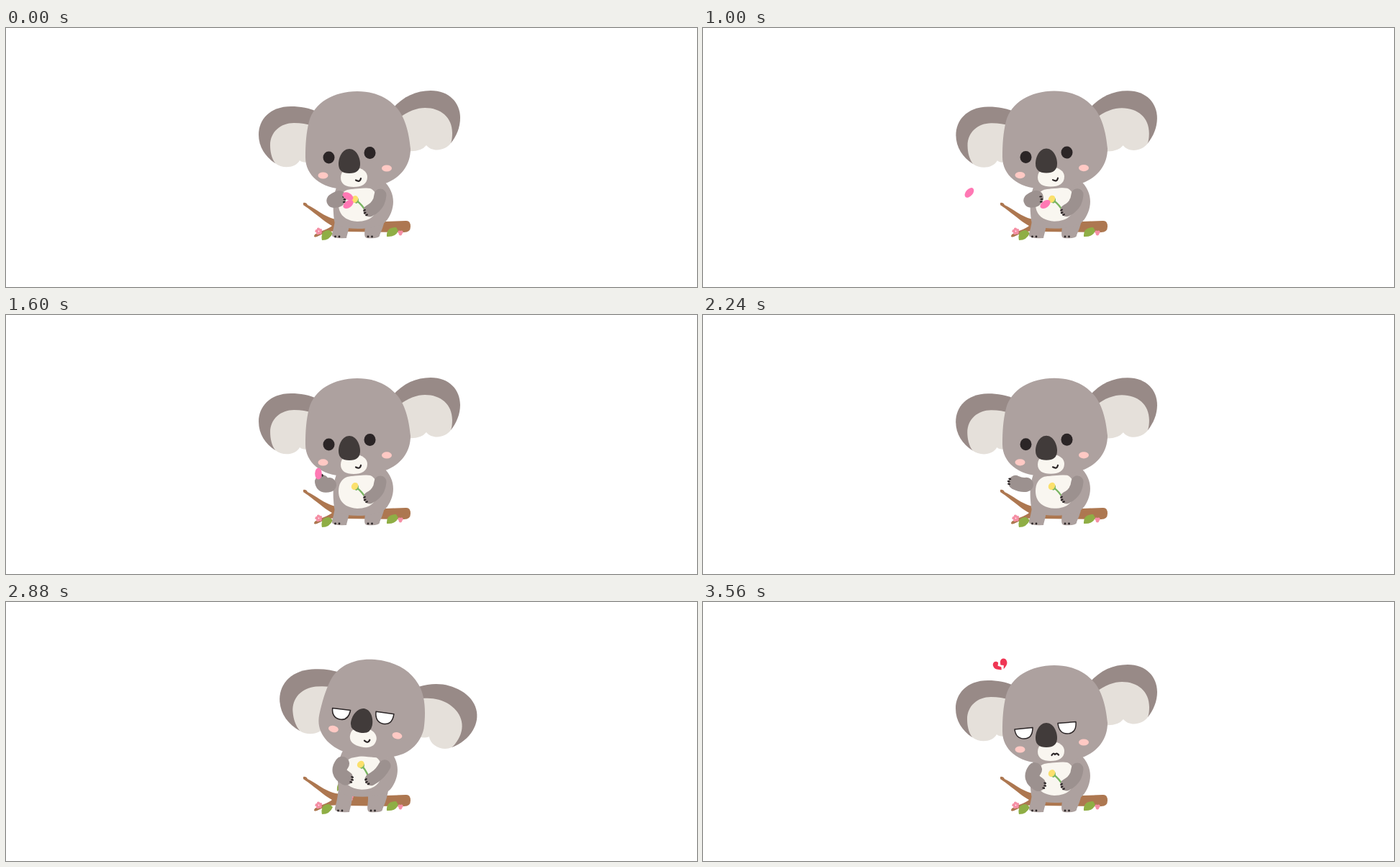
An HTML page for the animation above (3.64 s loop, 960 px wide and 360 px high).

```html
<!DOCTYPE html>
<html lang="en">
<head>
<meta charset="utf-8">
<title>Koala plucking petals</title>
<style>
html, body { margin: 0; width: 100%; height: 100%; overflow: hidden; background: #fff; }
svg { display: block; width: 100vw; height: 100vh; }
.fur { fill: #ada19f; }
.ear { fill: #988a87; }
.inner { fill: #e5e0da; }
.arm { fill: none; stroke: #9c918f; stroke-linecap: round; stroke-linejoin: round; }
.cream { fill: #f9f6f0; }
.dark { fill: #2b2526; }
.wood { fill: #ad7750; }
.leaf { fill: #8fae45; }
.bud { fill: #f58fa5; }
.petal { fill: #ff78b4; }
.cheek { fill: #ffc9c4; }
.line { fill: none; stroke: #2b2526; stroke-width: 2.2; stroke-linecap: round; stroke-linejoin: round; }
.lid { fill: #fff; stroke: #2b2526; stroke-width: 1.5; stroke-linejoin: round; }
.heart { fill: #ef3654; }
</style>
</head>
<body>
<svg viewBox="0 0 960 360">
  <defs>
    <g id="claws" class="dark">
      <ellipse cx="-1" cy="-3.6" rx="2" ry="1.2"/>
      <ellipse rx="2" ry="1.2"/>
      <ellipse cx="-1" cy="3.6" rx="2" ry="1.2"/>
    </g>
    <ellipse id="petal" class="petal" rx="8" ry="4.8"/>
  </defs>

  <path class="wood" d="M413 243Q417 242 419 246C432 252 441 262 458 266Q490 271 528 269L555 268Q562 267 562 276Q562 284 553 284L470 283Q456 281 445 284L432 290Q426 292 429 287C437 282 447 280 453 275C443 270 428 256 413 246Z"/>
  <path class="leaf" d="M439 295Q436 281 449 281L454 285Q450 295 439 295ZM529 290Q528 277 542 277L545 282Q541 291 529 290ZM460 263Q459 252 465 251V260Z"/>
  <g id="buds" class="bud"></g>

  <g id="earL">
    <path class="ear" d="M434 117C421 111 409 109 396 109C366 109 351 128 351 148C351 165 360 179 374 188L425 180Z"/>
    <path class="inner" d="M374 188C369 181 367 172 367 163C367 144 382 132 400 132Q415 132 425 136L424 186Q412 188 408 184C402 195 384 196 374 188Z"/>
  </g>
  <g id="earR">
    <path class="ear" d="M537 112C552 95 570 87 590 87C616 87 631 104 631 125C631 138 626 150 618 160L550 150Z"/>
    <path class="inner" d="M544 127C558 115 572 111 582 111C604 111 620 124 620 146Q620 155 618 160C610 171 592 173 584 163Q576 173 556 171Z"/>
  </g>

  <g id="legs">
    <path class="fur" d="M458 256C457 276 453 284 453 288Q453 293 473 292C474 286 477 280 477 268V256Z"/>
    <path class="fur" d="M528 256C525 278 520 284 519 289Q518 293 501 292C496 290 499 282 499 274V256Z"/>
    <g id="toes" class="dark"></g>
  </g>

  <g id="body">
    <path class="fur" d="M462 215C453 232 454 252 456 268Q458 279 489 279Q522 279 530 266C541 250 542 228 524 212Z"/>
    <path class="cream" d="M474 225Q490 221 506 223C514 226 517 236 516 246C515 262 504 269 488 269C472 268 462 260 462 245C462 235 466 228 474 225Z"/>
    <g id="flower">
      <path d="M487 240Q497 247 503 261" fill="none" stroke="#79b562" stroke-width="2.4"/>
      <path fill="#79b562" d="M482 242L489 236Q492 241 487 244Z"/>
      <ellipse cx="484.500" cy="238" rx="4.400" ry="5.300" fill="#fbe06c" transform="rotate(35 484.500 238)"/>
    </g>
    <path id="armR" class="arm" stroke-width="17"/>
    <use id="handR" href="#claws"/>
    <path id="armL" class="arm" stroke-width="20"/>
    <use id="handL" href="#claws"/>
  </g>

  <g id="head">
    <path class="fur" d="M488 88C455 88 428 104 421 130C417 146 416 162 416 180C416 205 438 223 470 224Q505 224 527 216C549 208 562 190 562 168C560 145 554 122 541 109C528 95 510 88 488 88Z"/>
    <g id="face">
      <ellipse class="cheek" cx="440.500" cy="205" rx="7" ry="4.600"/>
      <ellipse class="cheek" cx="529" cy="195" rx="7" ry="4.600"/>
      <g id="open" class="dark">
        <ellipse cx="448.500" cy="180" rx="8" ry="8.500"/>
        <ellipse cx="505.500" cy="173.500" rx="8" ry="8.500"/>
      </g>
      <g id="half" class="lid">
        <path d="M433 177L458 174.500C458 185 454 190 446 190C438 190 434 185 433 177Z"/>
        <path d="M493 168.500L518 166.500C519 178 514 183 506 183C498 183 494 178 493 168.500Z"/>
      </g>
      <path class="cream" d="M465 208C465 198 474 194 484 194C495 194 502 200 502 207C502 217 494 221 483 221C472 221 465 217 465 208Z"/>
      <path fill="#413b3a" d="M477 168C486 168 492 179 492 189Q492 202 477 202Q462 202 462 189C462 179 468 168 477 168Z"/>
      <path id="smile" class="line" d="M486 211.500Q492 215 493 209"/>
      <path id="frown" class="line" d="M484.500 213Q486.500 209 489 212Q491.500 209 494 212.500"/>
    </g>
  </g>

  <use id="petal1" href="#petal"/>
  <use id="petal2" href="#petal"/>

  <g id="heart" class="heart">
    <path d="M-2-3C-4-8-11-6-10 0C-10 4-5 6-1 8L0 4L-4 1Z"/>
    <path d="M1-3C3-8 10-7 10-1C10 4 5 6 2 8L4 3L0 1Z"/>
  </g>
</svg>
<script>
const LOOP = 3640, STEP = 40, SECOND_PLUCK = 1210, RELEASE = 390;
const $ = id => document.getElementById(id);
const set = (id, value, attr = 'transform') => $(id).setAttribute(attr, value);
const show = (id, on) => set(id, on ? 'visible' : 'hidden', 'visibility');
const clamp = v => Math.max(0, Math.min(1, v));
const ramp = (t, a, b) => {
  const v = clamp((t - a) / (b - a));
  return v * v * (3 - 2 * v);
};
const mix = (a, b, k) => a.map((v, i) => v + (b[i] - v) * k);
const dot = (x, y, r) => `<circle cx="${x}" cy="${y}" r="${r}"/>`;

function bud(x, y, n, spread) {
  for (let i = 0; i < n; i++) {
    const a = i / n * Math.PI * 2 - .5;
    $('buds').innerHTML += dot(x + spread * Math.cos(a), y + spread * Math.sin(a), 2.2);
  }
}
bud(434.5, 282.5, 5, 2.9);
bud(478.5, 272, 4, 2.4);
bud(548, 284.5, 3, 1.7);
for (const x of [457.5, 463, 503, 508.5]) $('toes').innerHTML += dot(x, 290, 1.4);

// Arm poses: shoulder, elbow, hand, direction of the claws.
const grip = [463, 236, 449, 242, 461, 239, -5];
const lift = [449, 236, 440, 239, 439, 232, -110];
const reach = [449, 236, 442, 237, 434, 233, -170];
const fold = [461, 233, 452, 245, 466, 253, 15];

function arm(side, [sx, sy, ex, ey, hx, hy, angle], length) {
  set('arm' + side, `M${sx} ${sy}Q${ex} ${ey} ${hx} ${hy}`, 'd');
  set('hand' + side, `translate(${hx} ${hy}) rotate(${angle}) translate(${length} 0)`);
}

function ear(id, x, y, dx, dy, angle, grow, k, sway) {
  set(id, `translate(${x + dx * k} ${y + dy * k}) rotate(${angle * k + sway}) scale(${1 + grow * k}) translate(${-x} ${-y})`);
}

// Pulled off the flower, held up, then let go to sway down to the left.
function petal(id, s, onFlower, life) {
  const [x, y, angle] = mix(onFlower, [434, 220.5, 90], ramp(s, 170, 330));
  const f = Math.max(0, s - RELEASE);
  const fallX = x - .105 * f, fallY = y - .035 * f + 8e-5 * f * f;
  set(id, `translate(${fallX} ${fallY}) rotate(${angle - 42 * Math.sin(f / 125)})`);
  set(id, clamp((life - f) / 150), 'opacity');
}

function draw(t) {
  const turn = ramp(t, 2290, 2540) - ramp(t, 2940, 3160);
  const breath = (1 - Math.cos(t / 1820 * Math.PI * 2)) / 2;

  ear('earL', 430, 116, 31, -18, -4, .06, turn, -.7 * breath);
  ear('earR', 540, 109, 37, 8, 30, .02, turn, .4 * breath);
  set('head', `translate(${23 * turn} ${-7 * turn - .4 * breath}) rotate(${12.5 * turn} 489 155)`);
  set('face', `translate(${-turn} ${-9.5 * turn})`);
  set('body', `translate(${6 * turn} ${-8 * turn - .3 * breath})`);
  set('legs', `translate(${4 * turn} 0)`);
  set('flower', `translate(${2 * turn} ${-4 * turn}) rotate(${12 * turn} 485 239)`);

  // The second pluck ends with the hand left open.
  const s = t < SECOND_PLUCK ? t : Math.min(t - SECOND_PLUCK, 640);
  let pose = mix(grip, lift, ramp(s, 170, 330));
  pose = mix(pose, reach, ramp(s, RELEASE, 470));
  pose = mix(pose, grip, ramp(s, 640, 860));
  arm('L', mix(pose, fold, ramp(t, 2300, 2480)), 9.5);
  arm('R', mix([520, 232, 519, 247, 505, 254, 155], [520, 236, 514, 248, 501, 255, 150], turn), 7);

  petal('petal1', t, [475, 234, 28], 950);
  petal('petal2', t - SECOND_PLUCK, [475.5, 245, 145], 600);

  const annoyed = t >= 2420, sad = t >= 3080;
  show('open', !annoyed);
  show('half', annoyed);
  show('smile', !sad);
  show('frown', sad);
  set('heart', `translate(413 86.5) rotate(-20) scale(${ramp(t, 3120, 3280)})`);
}

const start = performance.now();
function tick() {
  const t = (performance.now() - start) % LOOP;
  draw(Math.min(LOOP - 2 * STEP, Math.floor(t / STEP) * STEP));
  requestAnimationFrame(tick);
}
tick();
</script>
</body>
</html>
```
